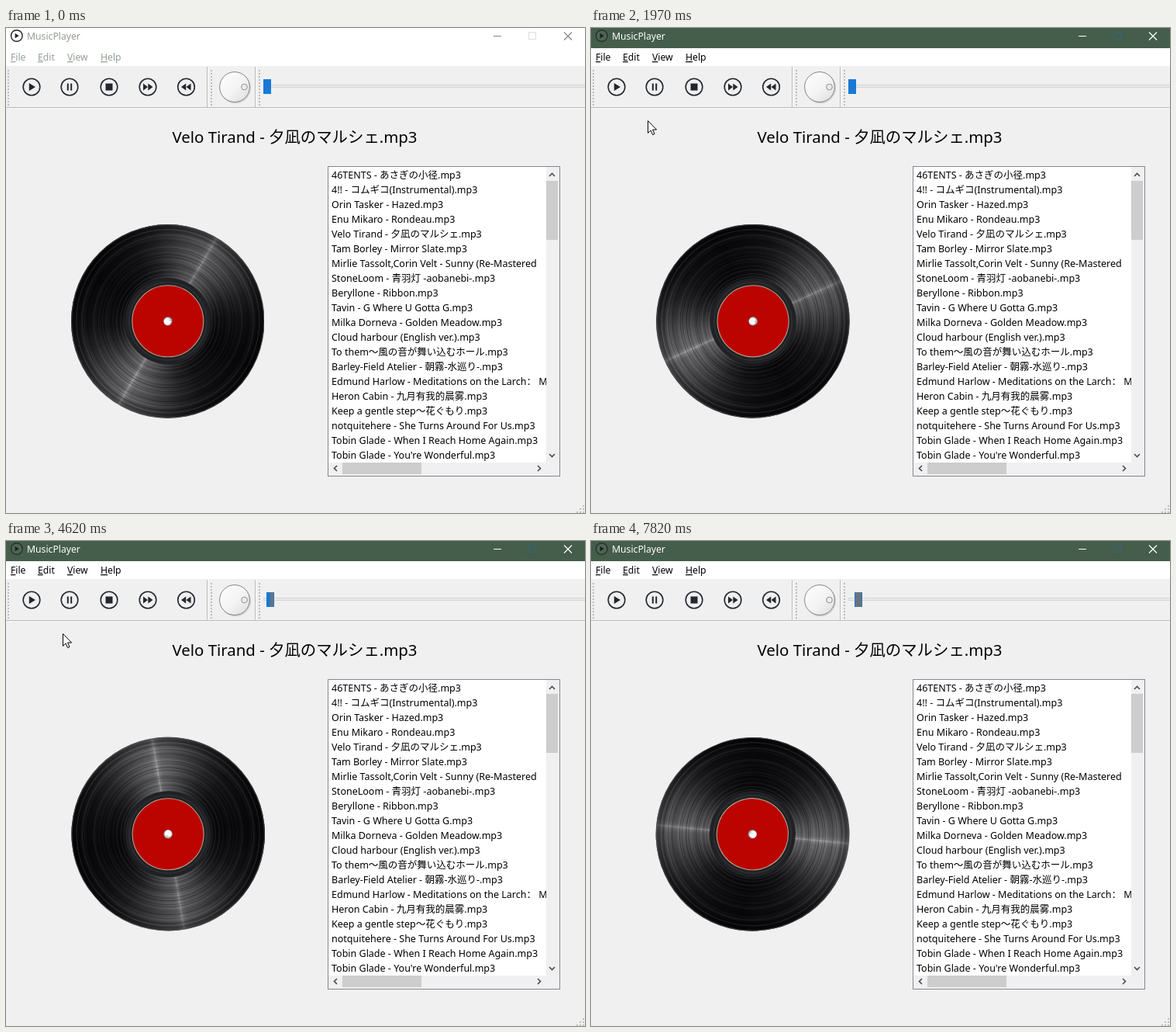
An HTML page for the animation above (8000 ms loop, 747 by 625 pixels).

```html
<!DOCTYPE html>
<html lang="en">
<head>
<meta charset="utf-8">
<title>MusicPlayer</title>
<style>
html, body { margin: 0; width: 100%; height: 100%; overflow: hidden; background: #f0f0f0; }
#stage { position: relative; width: 747px; height: 625px; overflow: hidden; }
#stage > * { position: absolute; left: 0; top: 0; }
text { font-family: "Noto Sans", "Noto Sans CJK SC", "Noto Sans CJK JP", sans-serif; font-size: 12.2px; white-space: pre; }
#stage > #disc {
  left: 83.6px; top: 253.3px; width: 249.6px; height: 249.6px; border-radius: 50%;
}
#disc svg { display: block; width: 100%; height: 100%; }
</style>
</head>
<body>
<div id="stage">
<svg width="747" height="625" viewBox="0 0 747 625">
  <defs>
    <linearGradient id="dial" x1="0" y1="0" x2="1" y2="1">
      <stop offset="0" stop-color="#fff"/><stop offset=".55" stop-color="#f3f3f3"/><stop offset="1" stop-color="#dcdcdc"/>
    </linearGradient>
    <clipPath id="rows"><rect x="416" y="179" width="281" height="381"/></clipPath>
  </defs>
  <rect width="747" height="625" fill="#f0f0f0"/>

  <rect id="bar" width="747" height="26"/>
  <g id="appIcon" fill="none" stroke-width="1.4">
    <circle cx="13.8" cy="10" r="7.3"/><path d="M11.6 6.7v6.6l5.2-3.3z" stroke="none"/>
  </g>
  <text id="caption" x="27" y="15">MusicPlayer</text>
  <g id="sysButtons" fill="none" stroke-width="1.2"><path d="M629 10.5h10M720 5.5l10 10M730 5.5l-10 10"/></g>
  <rect id="maxButton" x="674.5" y="5.5" width="9" height="9" fill="none"/>

  <rect y="26" width="747" height="23" fill="#fff"/>
  <g id="menu"></g>

  <path d="M0 102.5H747M259.5 50V102M321.5 50V102" stroke="#b9b9b9"/>
  <path d="M0 103.5H747M260.5 50V102M322.5 50V102" stroke="#fafafa"/>
  <path d="M3 54V100M265 54V100M327 54V100" stroke="#bdbdbd" stroke-width="2" stroke-dasharray="2 2"/>

  <rect id="hover" x="8.5" y="51.5" width="49" height="48"/>
  <g id="buttons" fill="#23272e"></g>

  <circle cx="296" cy="77.2" r="20" fill="#d2d2d2"/>
  <circle cx="295" cy="76" r="19.4" fill="url(#dial)" stroke="#858585"/>
  <circle cx="307.5" cy="76" r="3.8" fill="#ececec" stroke="#8f8f8f"/>

  <rect x="332.5" y="73.5" width="420" height="3" fill="#e7eaea" stroke="#d6d6d6"/>
  <rect id="knob" y="66" width="10" height="19" fill="#1a78d6"/>
  <rect id="knobFresh" x="341" y="66" height="19" fill="#69737d"/>

  <text x="372.5" y="148" text-anchor="middle" style="font-size:20.4px">Velo Tirand - 夕凪のマルシェ.mp3</text>

  <rect x="415.5" y="178.5" width="299" height="399" fill="#fff" stroke="#828790"/>
  <g id="list" clip-path="url(#rows)"></g>
  <path d="M697 179h17v398H416v-17h281z" fill="#f0f0f0"/>
  <path d="M697 197h15v76h-15zM434 560h102v15H434z" fill="#cdcdcd"/>
  <path d="M701 191l3.5-3.5L708 191M701 549l3.5 3.5L708 549M427 564l-3.5 3.5L427 571M686 564l3.5 3.5L686 571"
    fill="none" stroke="#505050" stroke-width="1.7"/>
  <g id="grip" fill="#bdbdbd"></g>
  <text id="status" x="4" y="620">Play</text>
</svg>

<div id="disc">
  <svg viewBox="-124.8 -124.8 249.6 249.6">
    <defs>
      <radialGradient id="rim" gradientUnits="userSpaceOnUse" cx="0" cy="0" r="124.8">
        <stop offset=".45" stop-opacity=".1"/><stop offset=".65" stop-opacity="0"/>
        <stop offset=".85" stop-opacity=".04"/><stop offset=".98" stop-opacity=".35"/>
      </radialGradient>
    </defs>
    <circle r="124.8" fill="url(#rim)"/>
    <g id="grooves" fill="none"></g>
    <circle r="124.2" fill="none" stroke="#55575a" stroke-opacity=".75"/>
    <circle r="55.5" fill="#1f2124"/>
    <circle r="50" fill="none" stroke="#2b2d30" stroke-width="2"/>
    <circle r="46" fill="#bb0400" stroke="#b5a08c" stroke-width="1.1"/>
    <circle r="5.8" fill="#8d8884"/>
    <circle cx="-.4" cy=".4" r="4.7" fill="#fff"/>
    <path d="M1 -4.6A4.7 4.7 0 0 1 4.6 1L2 0z" fill="#cfcfcf"/>
  </svg>
</div>

<svg id="cursor" width="14" height="21" viewBox="0 0 14 21">
  <path d="M.5 .6V16.4L4.1 12.9L6.6 18.6L9 17.5L6.6 12H11.6z" fill="#fff" stroke="#000"/>
</svg>
</div>

<script>
const NS = "http://www.w3.org/2000/svg";
const $ = id => document.getElementById(id);

function add(parent, tag, attrs, text) {
  const el = document.createElementNS(NS, tag);
  for (const k in attrs) el.setAttribute(k, attrs[k]);
  if (text) el.textContent = text;
  $(parent).appendChild(el);
  return el;
}
const set = (id, attrs) => { for (const k in attrs) $(id).setAttribute(k, attrs[k]); };
const show = (id, on) => { $(id).style.visibility = on ? "visible" : "hidden"; };

// Menu with underlined access keys
[["File", 6], ["Edit", 41], ["View", 79], ["Help", 122]].forEach(([label, x]) => {
  const t = add("menu", "text", { x, y: 42 });
  t.innerHTML = `<tspan text-decoration="underline">${label[0]}</tspan>${label.slice(1)}`;
});

// Transport buttons, drawn around their own centre
const glyphs = [
  [33, "M-3.2 -5V5L5 0z"],
  [82, "M-3.2 -4.5h2v9h-2zM1.2 -4.5h2v9h-2z"],
  [133, "M-4.5 -4.5h9v9h-9z"],
  [183, "M-6 -4.5V4.5L0 0zM.3 -4.5V4.5L6.5 0z"],
  [232.5, "M6 -4.5V4.5L0 0zM-.3 -4.5V4.5L-6.5 0z"]
];
const buttons = glyphs.map(([x, d]) => {
  const g = add("buttons", "g", { transform: `translate(${x} 76)` });
  g.innerHTML = `<circle r="10.8" fill="none" stroke="#23272e" stroke-width="1.6"/><path d="${d}"/>`;
  return g;
});

const songs = `46TENTS - あさぎの小径.mp3
4!! - コムギコ(Instrumental).mp3
Orin Tasker - Hazed.mp3
Enu Mikaro - Rondeau.mp3
Velo Tirand - 夕凪のマルシェ.mp3
Tam Borley - Mirror Slate.mp3
Mirlie Tassolt,Corin Velt - Sunny (Re-Mastered
StoneLoom - 青羽灯 -aobanebi-.mp3
Beryllone - Ribbon.mp3
Tavin - G Where U Gotta G.mp3
Milka Dorneva - Golden Meadow.mp3
Cloud harbour (English ver.).mp3
To them～風の音が舞い込むホール.mp3
Barley-Field Atelier - 朝霧-水巡り-.mp3
Edmund Harlow - Meditations on the Larch： Med
Heron Cabin - 九月有我的晨雾.mp3
Keep a gentle step～花ぐもり.mp3
notquitehere - She Turns Around For Us.mp3
Tobin Glade - When I Reach Home Again.mp3
Tobin Glade - You're Wonderful.mp3`.split("\n");
songs.forEach((s, i) => add("list", "text", { x: 420, y: 194 + 19 * i, style: "font-size:12.5px" }, s));

for (let r = 0; r < 3; r++)
  for (let c = 0; c <= r; c++)
    add("grip", "rect", { x: 744 - 4 * c, y: 615 + 4 * r, width: 2, height: 2 });

// Record: two opposite sheens, the lower one stronger, plus seeded grooves
const sheen = [[0, 142], [1.3, 112], [4, 94], [14, 78], [26, 56], [40, 33], [55, 18], [72, 11], [90, 8]];
const stop = (angle, v) => `rgb(${v},${v},${v + 3}) ${angle}deg`;
const rise = (at, gain) => [...sheen].reverse().map(([a, v]) => stop(at - a, v * gain));
const fall = (at, gain) => sheen.map(([a, v]) => stop(at + a, v * gain));
const stops = [...fall(0, 1), ...rise(180, 1.12), ...fall(180, 1.12), ...rise(360, 1)];
$("disc").style.background = `conic-gradient(from 30.5deg, ${stops.join(", ")})`;

let seed = 7;
const rnd = () => (seed = seed * 16807 % 2147483647) / 2147483647;
for (let r = 57; r < 123; r += 1.3) {
  const light = rnd() < .45;
  add("grooves", "circle", {
    r, stroke: light ? "#fff" : "#000",
    "stroke-opacity": (light ? .1 : .22) * rnd(), "stroke-width": 1.2
  });
}
[72, 86, 94, 104, 115].forEach(r =>
  add("grooves", "circle", { r, stroke: "#000", "stroke-opacity": .3, "stroke-width": 1.1 }));

const LOOP = 8000, ACTIVATE = 1510, RELEASE = 1590;
const ticks = [RELEASE, 2600, 3610, 4620, 5550, 6560, 7580];
const knobX = [332, 332, 333, 335, 336, 337, 339, 340];

const IN = [514, 563], REST = [69, 119], PLAY = [42, 80], PARK = [73, 119], OUT = [1, 594];
// start, step length, steps to arrive, index of first step, from, to, easing
const moves = [
  [130, 77, 10, 0, IN, REST, p => 1 - (1 - p) ** 1.8],
  [970, 77.5, 5, 1, REST, PLAY, p => p],
  [1510, 76.6, 6, 0, PLAY, PARK, p => p ** 1.4],
  [7260, 80, 7, 1, PARK, OUT, p => p ** 1.2]
];

function cursorAt(t) {
  const m = moves.filter(v => t >= v[0]).pop();
  if (!m || t >= 7820) return null;
  const [start, dt, n, first, a, b, ease] = m;
  const p = ease(Math.min(1, (Math.floor((t - start) / dt + .01) + first) / n));
  return a.map((v, i) => Math.round(v + (b[i] - v) * p));
}

function draw(t) {
  const active = t >= ACTIVATE, pressed = active && t < RELEASE;
  set("bar", { fill: active ? "#455d4b" : "#fff" });
  set("caption", { fill: active ? "#fff" : "#959c95" });
  set("sysButtons", { stroke: active ? "#fff" : "#858585" });
  set("maxButton", { stroke: active ? "#33657a" : "#dedede" });
  set("menu", { fill: active ? "#000" : "#93a093" });
  set("appIcon", { stroke: active ? "#26332a" : "#222", fill: active ? "#17201a" : "#222" });
  $("appIcon").firstElementChild.setAttribute("fill", active ? "#506456" : "#fff");

  const pos = cursorAt(t);
  show("cursor", pos);
  if (pos) $("cursor").style.transform = `translate(${pos[0]}px, ${pos[1]}px)`;
  const over = pos && pos[0] >= 8 && pos[0] < 58 && pos[1] >= 51 && pos[1] < 100;
  show("hover", over);
  set("hover", pressed ? { fill: "#c0dcf3", stroke: "#90c8f6" } : { fill: "#d8e6f2", stroke: "#c0dcf3" });
  show("status", over);
  buttons[0].setAttribute("transform", pressed ? "translate(34 77)" : "translate(33 76)");

  const n = ticks.filter(k => t >= k).length, x = knobX[n], turn = 35 * n;
  const sway = .5 * Math.sin(turn * Math.PI / 180);
  $("disc").style.transform = `translateX(${sway}px) rotate(${turn}deg)`;
  set("knob", { x });
  set("knobFresh", { width: x - 332 });
}

const t0 = performance.now();
function frame() {
  draw((performance.now() - t0) % LOOP);
  requestAnimationFrame(frame);
}
draw(0);
requestAnimationFrame(frame);
</script>
</body>
</html>
```
